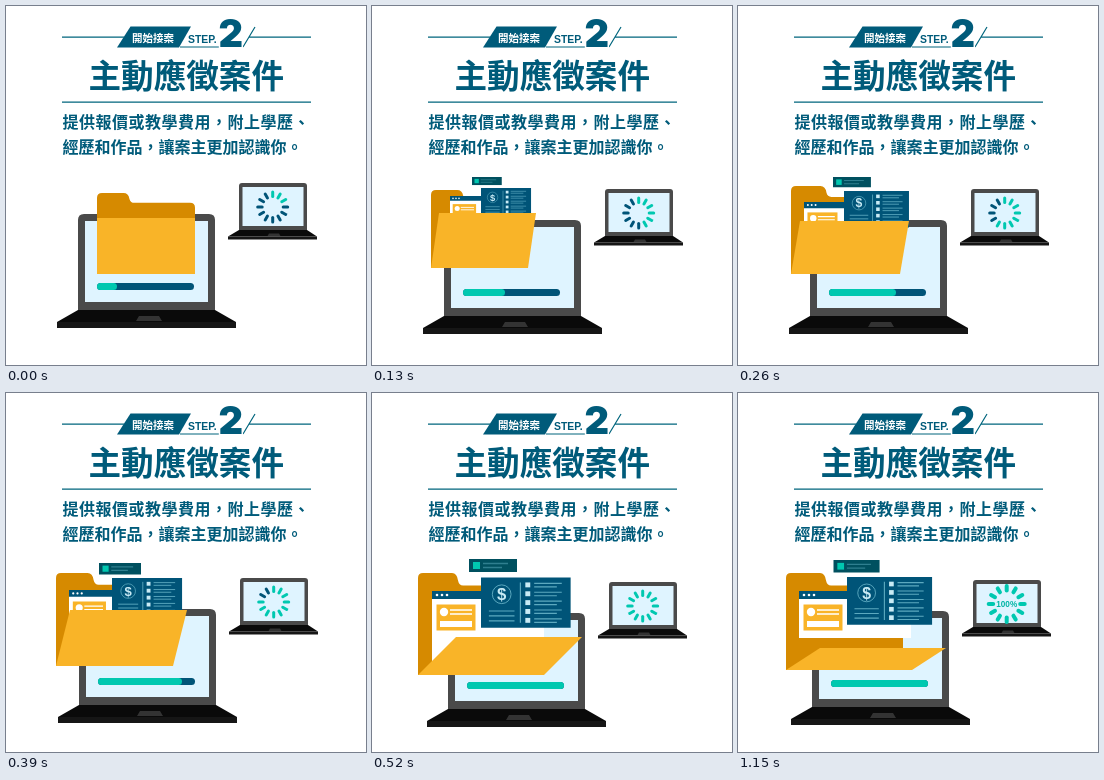
These frames come from a looping animation (360x359 px, 1.48 s). An HTML page:

```html
<!DOCTYPE html>
<html lang="zh-Hant">
<head>
<meta charset="utf-8">
<title>主動應徵案件</title>
<style>
  html, body { margin: 0; width: 100%; height: 100%; overflow: hidden; background: #fff; }
  svg { display: block; width: 100%; height: 100%; }
  .zh { font-family: "Noto Sans CJK TC", "Noto Sans CJK", sans-serif; font-weight: 700; }
  .latin { font-family: "Liberation Sans", Arial, sans-serif; font-weight: 700; }
  .digit { font-family: Inter, sans-serif; font-weight: 900; }
</style>
</head>
<body>
<svg viewBox="0 0 360 359">
  <g fill="#005b7a">
    <path d="M124.5 20.5H185L173 41.5H111Z"/>
    <path d="M56 31.2H118M243 31.2H305M237 41L249 21M56 96.2H305" fill="none" stroke="#00657d" stroke-width="1.2"/>
    <path d="M174 41H230" stroke="#00657d"/>
    <text class="zh" x="126" y="35.5" font-size="10.5" fill="#fff">開始接案</text>
    <text class="latin" x="182" y="36.5" font-size="10.4">STEP.</text>
    <text class="digit" x="212.5" y="41" font-size="38" stroke="#fff" stroke-width="3" paint-order="stroke">2</text>
    <text class="zh" x="82.5" y="82" font-size="32.6">主動應徵案件</text>
    <text class="zh" x="56.5" y="121.5" font-size="16" letter-spacing=".5">提供報價或教學費用，附上學歷、</text>
    <text class="zh" x="56.5" y="146.5" font-size="16">經歷和作品，讓案主更加認識你。</text>
  </g>

  <g id="devices">
    <path d="M72 304V214Q72 208 78 208H203Q209 208 209 214V304Z" fill="#4a4a4a"/>
    <path d="M79 215H202V296H79Z" fill="#dff4ff"/>
    <path d="M72 304H209L230 316H51Z" fill="#0a0a0a"/>
    <path d="M51 316H230V322H51Z" fill="#161616"/>
    <path d="M133 310H153L156 315H130Z" fill="#333"/>
    <rect x="91" y="277" width="97" height="7" rx="3.5" fill="#005478"/>
    <rect id="fill" x="91" y="277" height="7" rx="3.5" fill="#00c8b0"/>

    <path d="M233 224V180Q233 177 236 177H298Q301 177 301 180V224Z" fill="#4a4a4a"/>
    <path d="M236.5 181H297.5V220H236.5Z" fill="#dff4ff"/>
    <path d="M233 224H301L311 230.5H222Z" fill="#0a0a0a"/>
    <path d="M222 230.5H311V233.5H222Z" fill="#161616"/>
    <path d="M263 227.5H273L274.5 230H261.5Z" fill="#333"/>
    <g id="spinner" transform="translate(266.7 201)" stroke-linecap="round"></g>
    <text id="done" class="latin" x="266.7" y="204" font-size="8.2" text-anchor="middle" fill="#00b5a5">100%</text>
  </g>

  <path id="back" fill="#d68a00"/>
  <g id="papers">
    <g id="label">
      <path d="M0 0H48V13H0Z" fill="#00505f"/>
      <path d="M4 3H11V10H4Z" fill="#00c8b0"/>
      <path d="M14 4.5H39M14 8.5H33" stroke="#2f7f8f" stroke-width="1.3"/>
    </g>
    <g id="page">
      <rect id="sheet" width="112" fill="#fff"/>
      <path d="M0 0H112V8H0Z" fill="#005478"/>
      <g fill="#fff"><circle cx="5" cy="4" r="1.3"/><circle cx="10" cy="4" r="1.3"/><circle cx="15" cy="4" r="1.3"/></g>
      <path d="M4.5 13.5H43.5V39.5H4.5Z" fill="#f9b428"/>
      <path d="M8 30H40V36H8Z" fill="#fff"/>
      <circle cx="12" cy="21" r="4.2" fill="#fff"/>
      <path d="M18 19H40M18 23H40" stroke="#fff" stroke-width="1.5"/>
    </g>
    <g id="quote">
      <path d="M0 0H91V51H0Z" fill="#005478"/>
      <circle cx="21" cy="17" r="9.5" fill="none" stroke="#5ca9bf"/>
      <text class="latin" x="21" y="23" font-size="17" text-anchor="middle" fill="#c9ebf5">$</text>
      <path d="M8 34H34M8 39H34M8 44H34M40 5V46" stroke="#5ca9bf" stroke-width="1.2"/>
      <g id="rows"></g>
    </g>
  </g>
  <path id="front" fill="#f9b428"/>
</svg>
<script>
const $ = id => document.getElementById(id);
const SPOKES = 12, STEP = 130, LOOP = 1480;

// folder: left, top, bottom, width of the back, width of the front; flap: lean, top
// label, page, quote: x, y, scale; sheet: page height before scaling
const poses = [
  { shift: [0, 0], bar: 20, lit: 3, folder: [91, 187, 268, 98, 98], flap: [0, 212] },
  { shift: [0, 6], bar: 42, lit: 6, folder: [59, 184, 262, 91, 97], flap: [8, 207],
    label: [100, 171, .62], page: [78, 190, .6], quote: [109, 182, .55], sheet: 70 },
  { shift: [0, 6], bar: 67, lit: 8, folder: [53, 180, 268, 97, 109], flap: [9, 215],
    label: [95, 171, .79], page: [66, 196, .77], quote: [106, 185, .714], sheet: 70 },
  { shift: [1, 8], bar: 84, lit: 10, folder: [50, 180, 273, 110, 117], flap: [14, 217],
    label: [93, 170, .875], page: [63, 197, .85], quote: [106, 185, .77], sheet: 70 },
  { shift: [4, 12], bar: 97, lit: 12, folder: [46, 180, 282, 124, 126], flap: [38, 244],
    label: [97, 166, 1], page: [60, 198, 1], quote: [109, 184.5, .985], sheet: 70 },
  { shift: [2, 10], bar: 97, lit: 12, folder: [48, 180, 277, 117, 126], flap: [34, 255],
    label: [95.5, 167, .96], page: [61, 198, 1], quote: [109, 184, .935], sheet: 47 },
];

$("spinner").innerHTML = Array.from({ length: SPOKES }, (_, i) =>
  `<path transform="rotate(${i * 360 / SPOKES})"/>`).join("");
$("rows").innerHTML = Array.from({ length: 5 }, (_, i) => {
  const y = 5 + i * 9;
  return `<path d="M45 ${y}h5v5h-5z" fill="#c9ebf5"/>
    <path d="M54 ${y + 1}h28m-28 3.5h23" stroke="#5ca9bf" stroke-width="1.2"/>`;
}).join("");

function place(id, [x, y, scale = 1]) {
  $(id).setAttribute("transform", `translate(${x} ${y}) scale(${scale})`);
}

function drawFolder([left, top, bottom, backWidth, frontWidth], [lean, flapTop]) {
  const tab = frontWidth * .27, drop = frontWidth * .1;
  $("back").setAttribute("d", `M${left} ${bottom}V${top + 5}q0 -5 5 -5h${tab - 5}
    q5 0 6 ${drop * .6}q1 ${drop * .4} 5 ${drop * .4}H${left + backWidth - 5}q5 0 5 5V${bottom}Z`);
  $("front").setAttribute("d",
    `M${left + lean} ${flapTop}h${frontWidth}L${left + frontWidth} ${bottom}H${left}Z`);
}

function render(time) {
  const index = Math.min(Math.floor(time % LOOP / STEP), poses.length - 1);
  const pose = poses[index], finished = index === poses.length - 1;
  place("devices", pose.shift);
  $("fill").setAttribute("width", pose.bar);
  $("spinner").setAttribute("stroke-width", finished ? 4 : 3);
  [...$("spinner").children].forEach((spoke, i) => {
    spoke.setAttribute("d", finished ? "M0 -13.5V-18" : "M0 -10.5V-15");
    spoke.setAttribute("stroke", i < pose.lit ? "#00c8b0" : "#005478");
  });
  $("done").setAttribute("visibility", finished ? "visible" : "hidden");
  drawFolder(pose.folder, pose.flap);
  $("papers").setAttribute("visibility", pose.page ? "visible" : "hidden");
  if (pose.page) {
    for (const id of ["label", "page", "quote"]) place(id, pose[id]);
    $("sheet").setAttribute("height", pose.sheet);
  }
}

const start = performance.now();
function tick() {
  render(performance.now() - start);
  requestAnimationFrame(tick);
}
tick();
</script>
</body>
</html>
```
